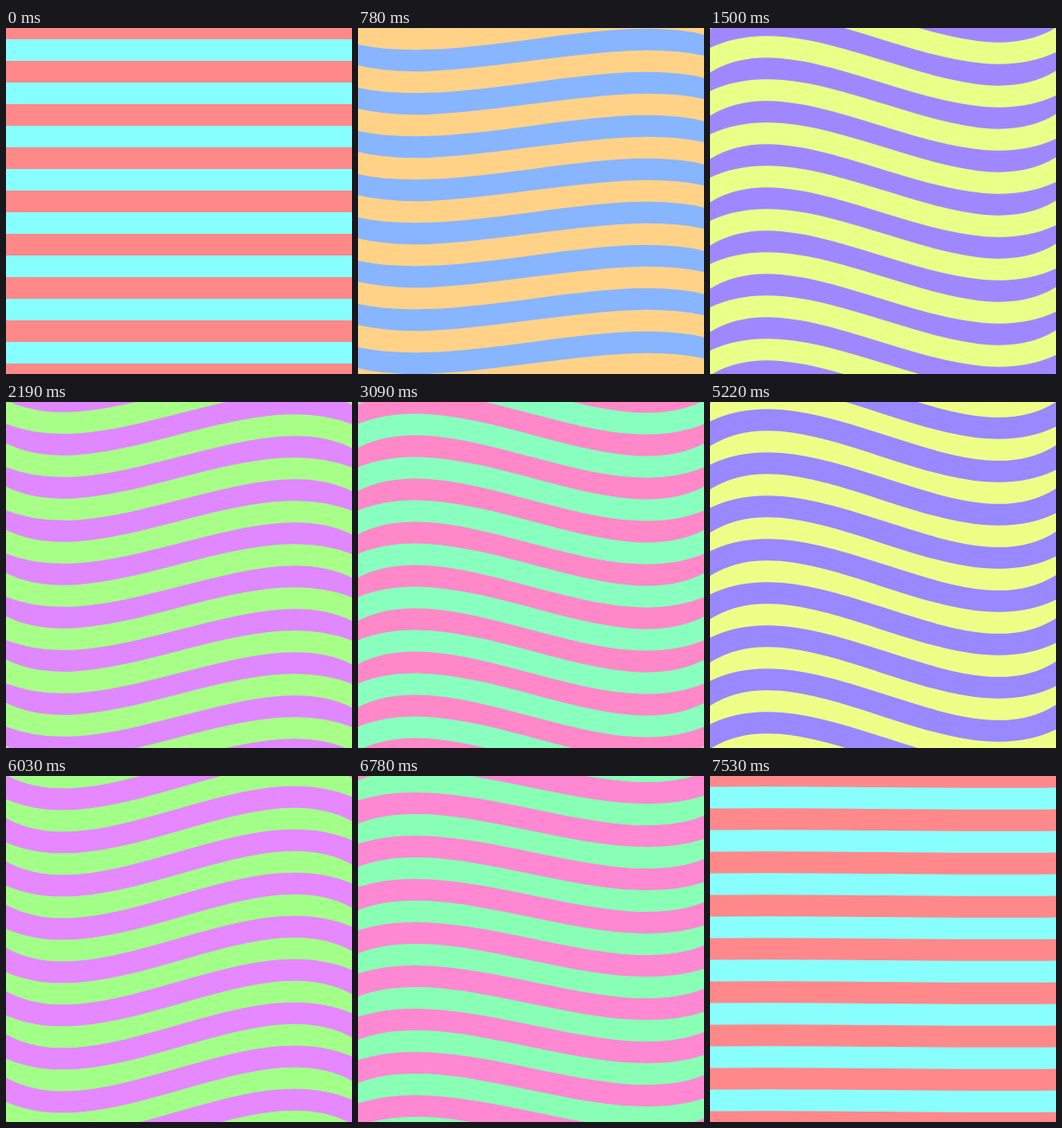
Write an HTML page with a canvas that moves like this. It is 400x400 px and loops after 7560 ms.

```html
<!DOCTYPE html>
<html lang="en">
<head>
<meta charset="utf-8">
<title>Waving stripes</title>
<style>
  html, body { margin: 0; width: 100%; height: 100%; overflow: hidden; }
  canvas { display: block; width: 400px; height: 400px; }
</style>
</head>
<body>
<canvas id="stage" width="400" height="400"></canvas>
<script>
  const SIZE = 400, STEP = 30, STEPS = 252;
  const GAP = 50, OFFSET = 0.5;
  const ctx = document.getElementById('stage').getContext('2d');

  const pastel = hue => `hsl(${hue % 360}, 100%, 76.67%)`;

  // Closed form of the sum of 10 * cos(0.1 k) for k = 1..n
  const bend = n => 5 * (Math.sin(0.1 * n + 0.05) / Math.sin(0.05) - 1);

  function draw(n) {
    const hue = n * 360 / STEPS;
    const a = bend(n);
    ctx.fillStyle = pastel(hue + 180);
    ctx.fillRect(0, 0, SIZE, SIZE);
    ctx.strokeStyle = pastel(hue);
    ctx.lineWidth = GAP / 2;
    ctx.beginPath();
    for (let y = OFFSET - GAP; y <= SIZE + GAP + OFFSET; y += GAP) {
      ctx.moveTo(-20, y);
      ctx.bezierCurveTo(100, y + a, 300, y - a, 420, y);
    }
    ctx.stroke();
  }

  const start = performance.now();
  function tick() {
    const time = performance.now() - start;
    draw(Math.floor(time / STEP) % STEPS);
    requestAnimationFrame(tick);
  }
  tick();
</script>
</body>
</html>
```
